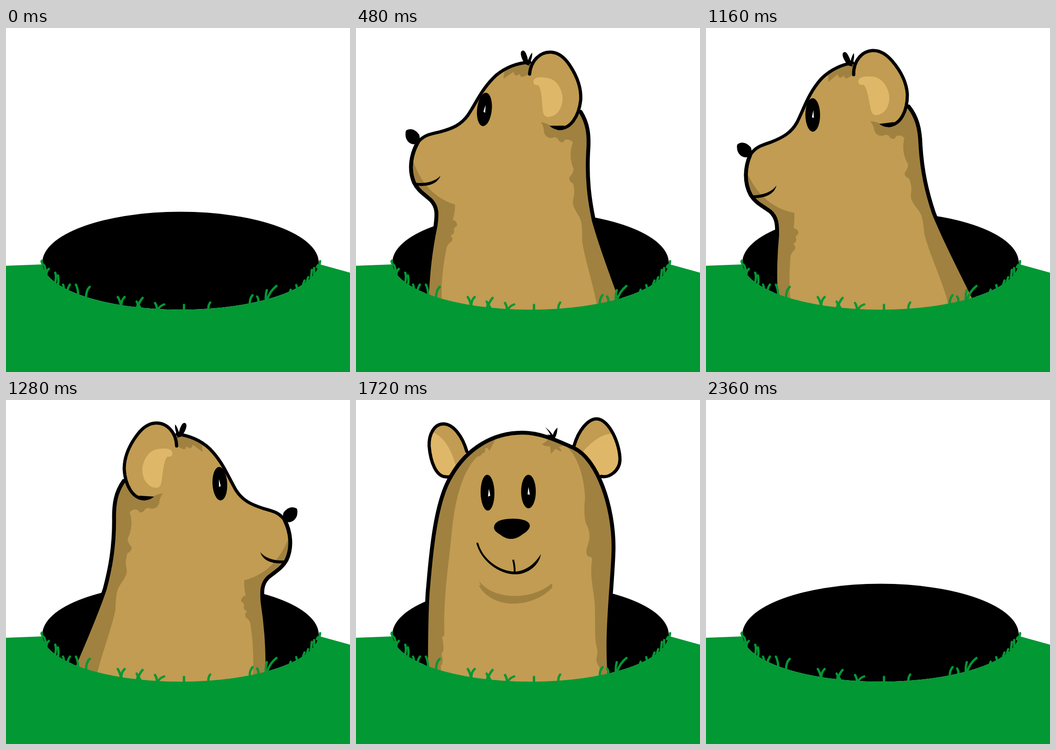
Write an HTML page that moves like this. It is 748x748 px and loops after 2.4 s.

```html
<!DOCTYPE html>
<html lang="en">
<head>
<meta charset="utf-8">
<title>Bear in a hole</title>
<style>
  html, body { margin: 0; width: 100%; height: 100%; overflow: hidden; background: #fff; }
  svg { display: block; width: 100%; height: 100%; }
  .fur { fill: #c19c52; }
  .shade { fill: #a08140; }
  .light { fill: #dfb768; }
  .line { fill: none; stroke: #000; stroke-linecap: round; stroke-linejoin: round; stroke-width: 7; }
  .spark { fill: #fff; }
  .grass { fill: none; stroke: #029834; stroke-linecap: round; stroke-width: 5; }
</style>
</head>
<body>
<svg viewBox="0 0 748 748">
  <defs>
    <path id="frontBody" d="M152 800V640C152 520 153 440 157 405C164 320 174 225 203 172C240 103 300 71 362 71C400 71 435 87 475 105C525 130 560 230 560 320C560 370 548 470 549 540C549 570 551 600 553 640V800"/>
    <path id="leftEar" d="M241 112C232 80 212 52 190 52C170 52 158 75 159 100C162 135 174 166 195 167Q202 168 206 166"/>
    <path id="rightEar" d="M474 100C484 65 505 41 523 41C550 41 574 95 574 130C573 155 550 170 533 166"/>
    <path id="sideBody" d="M153 800V640C153 560 153 510 164 440C166 415 166 400 152 386C135 372 122 366 112 348C98 318 104 285 116 261C128 245 140 242 162 236C190 227 208 218 222 196C240 165 250 135 280 105C300 87 325 77 350 74L466 176C483 200 488 225 487 262C487 320 495 365 507 410C525 465 550 520 575 580L600 640V800"/>
    <path id="sideEar" d="M351 100C352 70 372 50 395 50C410 50 425 60 437 76C455 100 465 125 465 150C463 185 447 215 420 215"/>
    <clipPath id="inFront"><use href="#frontBody"/></clipPath>
    <clipPath id="inLeftEar"><use href="#leftEar"/></clipPath>
    <clipPath id="inRightEar"><use href="#rightEar"/></clipPath>
    <clipPath id="inSide"><use href="#sideBody"/></clipPath>
  </defs>

  <path d="M79 510A300.500 110.500 0 0 1 680 510A300.500 102.500 0 0 1 79 510Z"/>

  <g id="front">
    <use href="#leftEar" class="fur"/>
    <path class="light" clip-path="url(#inLeftEar)" d="M166 70C190 78 208 108 217 144L206 170H150V70Z"/>
    <use href="#leftEar" class="line"/>
    <use href="#rightEar" class="fur"/>
    <path class="light" clip-path="url(#inRightEar)" d="M490 116C510 94 530 74 558 73L580 80V175H525Z"/>
    <use href="#rightEar" class="line"/>
    <use href="#frontBody" class="fur"/>
    <g class="shade" clip-path="url(#inFront)">
      <path d="M304 84L290 111Q286 102 281 105Q282 115 275 116Q272 122 264 123C225 160 212 240 207 300C200 370 190 430 192 508Q192 514 187 516Q191 530 190 545Q184 552 188 560Q190 570 184 580Q187 590 183 640V800H140V60Z"/>
      <path d="M448 94C485 115 498 180 498 215C495 240 497 262 501 270Q512 292 505 312Q497 335 505 340Q515 341 513 350C508 385 517 415 519 440C521 470 518 520 523 535Q527 550 523 560Q521 570 530 582Q526 600 528 640V800H600V90Z"/>
      <path d="M420 82Q414 92 404 96Q412 102 422 100L424 117L434 106Q440 110 447 112Q445 106 441 103L456 97Z"/>
      <path d="M268 394C300 437 385 435 425 399Q428 402 426 409C380 455 295 455 267 403L271 404Z"/>
    </g>
    <use href="#frontBody" class="line" style="stroke-width:8.5"/>
    <path d="M411 59Q421 66 428 76Q431 66 438 60Q438 73 432 84H425Q422 78 415 75L423 76Q418 66 411 59Z"/>
    <ellipse cx="286" cy="201.500" rx="15" ry="39" transform="rotate(-1 286 201)"/>
    <ellipse cx="375" cy="199" rx="16" ry="36.500"/>
    <path class="spark" d="M289 193L287 210L292 208ZM375 189L373 205L378 206Z"/>
    <path d="M300 277C302 262 318 259 340 258C360 258 378 262 378 274C377 284 365 290 355 297C340 306 325 302 314 293C306 288 300 284 300 277Z"/>
    <path class="line" style="stroke-width:4" d="M264 312C275 350 315 377 346 376M342 349Q345 360 345 374"/>
    <path d="M262 311C275 347 315 374 346 373C370 372 390 355 402 335C398 362 370 380 346 379C312 379 272 351 262 311Z"/>
  </g>

  <g id="side">
    <use href="#sideBody" class="fur"/>
    <g class="shade" clip-path="url(#inSide)">
      <path d="M296 92L295 113L316 97Q318 105 322 105L330 101Q331 108 336 107L352 100V70Z"/>
      <path d="M381 203Q395 205 402 210L430 216L466 170L530 300L640 640V800H530L525 600C515 555 490 490 484 455C483 430 482 415 475 404C466 390 457 380 460 367Q464 350 458 333Q448 328 449 320Q459 308 457 300C448 282 447 262 453 244Q447 237 440 238Q434 238 432 244Q424 246 420 238Q414 232 408 236Q394 238 389 225Q388 212 381 203Z"/>
      <path d="M106 296C120 335 148 378 204 392Q205 405 201 425Q213 430 210 439Q206 440 204 446Q208 454 198 460Q205 466 200 473Q191 479 190 490C186 520 182 560 186 600V800H90V300Z"/>
    </g>
    <path class="line" style="stroke-width:8.500" d="M153 800V640C153 560 153 510 164 440C166 415 166 400 152 386C135 372 122 366 112 348C98 318 104 285 116 261M466 176C483 200 488 225 487 262C487 320 495 365 507 410C525 465 550 520 575 580L600 640V800"/>
    <path class="line" d="M116 261C128 245 140 242 162 236C190 227 208 218 222 196C240 165 250 135 280 105C300 87 325 77 350 74"/>
    <use href="#sideEar" class="fur"/>
    <path class="light" d="M361 120C357 108 370 104 385 106C405 106 420 120 425 145C428 170 415 190 395 191C385 190 384 180 383 172C380 150 378 130 371 123Q364 124 361 120Z"/>
    <use href="#sideEar" class="line"/>
    <path d="M400 210Q418 209 432 208V216Q414 222 400 210Z"/>
    <path d="M331 51C336 47 340 52 344 63L346 70Q350 58 354 53Q356 60 351 74L349 82L340 79C332 68 327 56 331 51Z"/>
    <ellipse cx="257" cy="182" rx="16" ry="36.500" transform="rotate(3 257 182)"/>
    <path class="spark" d="M259 172L255 187L259 189Z"/>
    <path d="M90 236C100 230 110 234 118 244C122 252 118 262 113 264C104 269 92 262 89 250C88 244 88 238 90 236Z"/>
    <path d="M116 349C140 350 158 344 169 331C163 350 142 357 117 355Z"/>
  </g>

  <path fill="#029834" d="M0 517L79 514V510A300.500 102.500 0 0 0 680 510L683 514L748 532V748H0Z"/>
  <g class="grass">
    <path d="M80 514Q76 508 78 506M86 530Q86 522 83 516M88 535Q88 528 93 524M107 553Q110 540 107 532M113 558Q115 548 113 538M126 568Q126 562 124 558M134 572Q134 565 139 558M157 582Q157 568 152 558M174 587Q174 570 182 563"/>
    <path d="M250 604Q248 592 243 585M251 604Q250 592 258 585M285 607Q288 600 284 595M287 605Q290 595 297 587M292 608L286 598M328 611Q328 604 324 598M331 611Q335 604 344 601M387 612V602M440 609Q440 602 444 597"/>
    <path d="M530 599Q530 588 536 581M549 595Q549 588 546 584M565 592Q564 580 567 570M568 590Q574 572 588 561M617 575L619 569M633 567Q632 562 631 559M646 558L649 549M653 556L657 542M663 544L665 526M670 538V522M676 520L678 516M682 513L683 507"/>
  </g>
</svg>
<script>
  const LOOP = 2400;
  const poses = {
    front: document.getElementById('front'),
    side: document.getElementById('side')
  };
  const mirror = 'translate(722 0) scale(-1 1) ';

  // start time, pose, drop below full height, lean in degrees, facing right
  const steps = [
    [0, null],
    [40, 'front', 388], [80, 'front', 194], [120, 'front'],
    [480, 'side', 0, 3], [520, 'side', 0, 0.8], [560, 'side', 0, -2], [600, 'side'],
    [1160, 'side', 0, -3.4], [1200, 'side', 0, 3, true], [1240, 'side', 0, -2.2, true], [1280, 'side', 0, 0, true],
    [1640, 'side', 0, -1.3, true], [1680, 'side', 0, 3, true], [1720, 'front'],
    [2240, 'front', 145.5], [2280, 'front', 291], [2320, 'front', 437],
    [2360, null]
  ];

  const start = performance.now();

  function draw() {
    const time = (performance.now() - start) % LOOP;
    const [, pose, drop = 0, lean = 0, right] = steps.findLast(step => step[0] <= time);
    for (const [name, group] of Object.entries(poses)) {
      group.style.display = name === pose ? '' : 'none';
    }
    if (pose) {
      poses[pose].setAttribute('transform',
        `${right ? mirror : ''}translate(0 ${drop}) rotate(${lean} 361 605)`);
    }
    requestAnimationFrame(draw);
  }
  draw();
</script>
</body>
</html>
```
